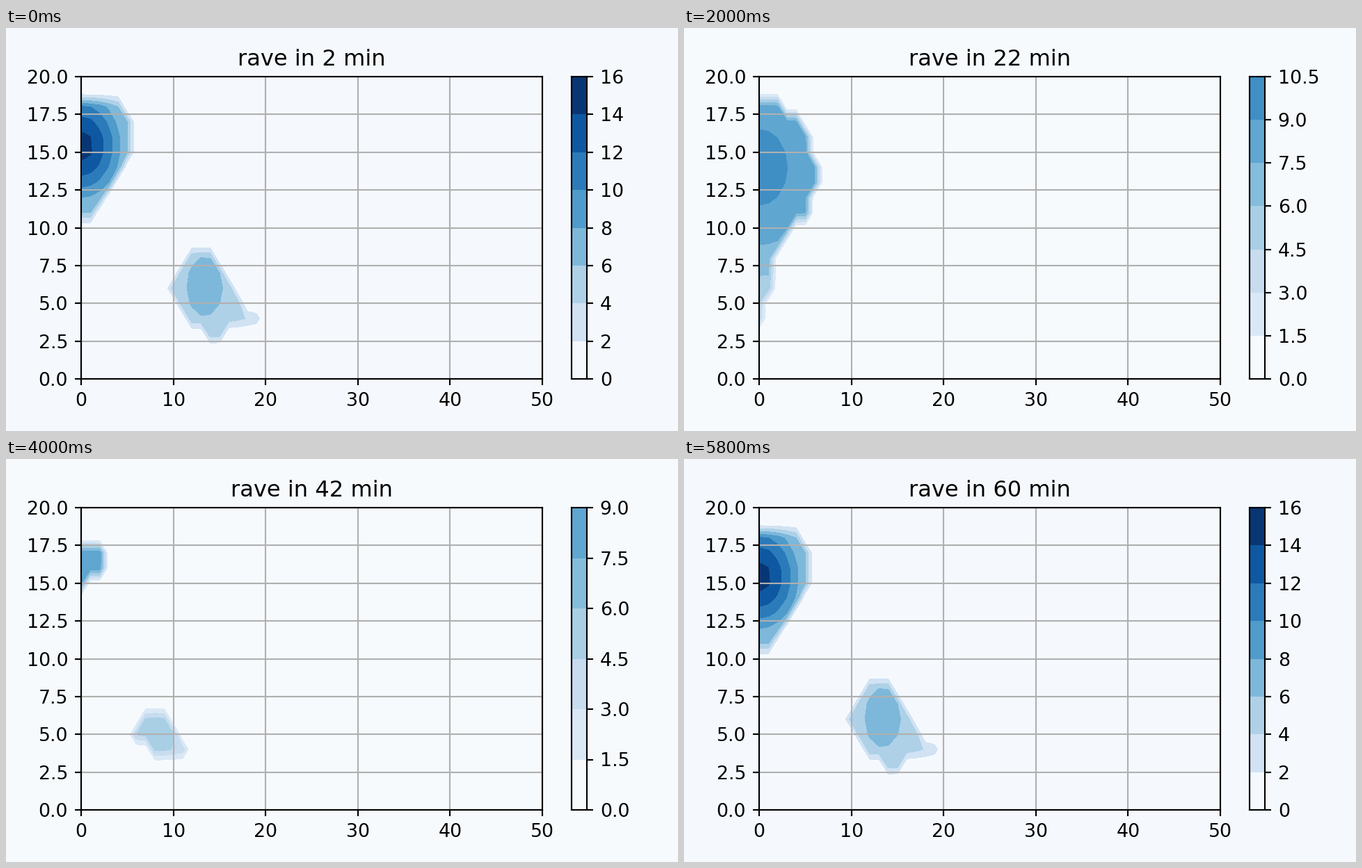
A matplotlib script for the animation above (6000 ms loop, 966 px wide and 580 px high).

```python
import numpy as np
import matplotlib
import matplotlib.pyplot as plt
from matplotlib.animation import FuncAnimation

W, H, DPI = 966, 580, 193
FRAMES, INTERVAL = 30, 200
VMAX = 15.4

plt.rcParams["font.family"] = "DejaVu Sans"
blues = matplotlib.colormaps["Blues"]
locator = matplotlib.ticker.MaxNLocator(8, min_n_ticks=1)
Y, X = np.mgrid[:21, :51]


def trace(outline):
    """Grid points along a closed outline of straight and diagonal edges."""
    for a, b in zip(outline, outline[1:] + outline[:1]):
        yield from np.linspace(a, b, max(abs(np.subtract(b, a))) + 1).astype(int)


def cell(outline, centre, radius, peak, edge):
    """Rain cell: a rounded cone from peak to edge, cut off at the outline."""
    points = np.array(list(trace(outline)))
    inside = np.zeros(X.shape, bool)
    for y in set(points[:, 1]):
        xs = points[points[:, 1] == y, 0]
        inside[y, xs.min():xs.max() + 1] = True
    d = np.hypot((X - centre[0]) / radius[0], (Y - centre[1]) / radius[1])
    return inside * (peak - (peak - edge) * np.minimum(d, 1) ** 1.5)


calm = np.zeros(X.shape)

# Cell at the left edge
west_peak = cell([(0, 18), (4, 18), (5, 17), (5, 15), (1, 11), (0, 11)],
                 (0, 15.4), (5, 4), peak=15.2, edge=6)
west_low = cell([(0, 11), (1, 11), (3, 9), (3, 7), (2, 6), (2, 5), (1, 4),
                 (1, 3), (0, 3)],
                (0, 8), (5.8, 5), peak=7.4, edge=4)
west_tall = cell([(0, 18), (2, 18), (3, 17), (4, 17), (5, 16), (5, 15), (6, 14),
                  (6, 13), (5, 12), (5, 11), (4, 11), (1, 8), (1, 6), (0, 5),
                  (0, 4)],
                 (0, 14), (11.5, 9.5), peak=9.8, edge=4)
west_loose = cell([(0, 17), (1, 18), (2, 18), (3, 17), (5, 17), (6, 16), (6, 15),
                   (5, 14), (3, 14), (1, 16), (0, 16)],
                  (3.4, 16), (4.1, 4.4), peak=10, edge=6)
west_rest = cell([(0, 17), (2, 17), (2, 16), (1, 16), (0, 15)],
                 (1, 17), (5, 3), peak=8.8, edge=7)

# Free cell drifting east
east_big = cell([(10, 6), (12, 8), (14, 8), (18, 4), (19, 4), (16, 4), (15, 3),
                 (14, 3), (13, 4), (12, 4)],
                (13.4, 6.1), (7, 7), peak=6.7, edge=2)
east_small = cell([(6, 5), (7, 6), (9, 6), (11, 4), (8, 4), (7, 5)],
                  (8, 5), (5, 4), peak=5.3, edge=2.5)
east_mid = cell([(6, 6), (7, 7), (10, 7), (13, 4), (16, 4), (9, 4), (8, 5),
                 (7, 5)],
                (7.8, 6), (8.5, 5), peak=7.05, edge=2)

KEYS = [0, 6, 10, 16, 20, 24, 29]
WEST = [west_peak, west_low, west_tall, west_loose, west_rest, calm, west_peak]
EAST = [east_big, calm, calm, calm, east_small, east_mid, east_big]


def centroid(grid):
    return np.array([(Y * grid).sum(), (X * grid).sum()]) / grid.sum()


def shifted(grid, step):
    dy, dx = np.rint(step).astype(int)
    return grid[np.clip(Y - dy, 0, Y.max()), np.clip(X - dx, 0, X.max())]


def morph(a, b, t):
    """Move a towards b while blending their values."""
    if not a.any() or not b.any():
        return (1 - t) * a + t * b
    move = centroid(b) - centroid(a)
    return (1 - t) * shifted(a, t * move) + t * shifted(b, (t - 1) * move)


def rain(frame):
    k = min(np.searchsorted(KEYS, frame, side="right") - 1, len(KEYS) - 2)
    t = (frame - KEYS[k]) / (KEYS[k + 1] - KEYS[k])
    return np.maximum(morph(WEST[k], WEST[k + 1], t),
                      morph(EAST[k], EAST[k + 1], t))


def box(left, top, right, bottom):
    return [left / W, 1 - bottom / H, (right - left) / W, (bottom - top) / H]


fig = plt.figure(figsize=(W / DPI, H / DPI), dpi=DPI)
ax = fig.add_axes(box(108, 70, 771, 505))
bar = fig.add_axes(box(813, 70, 835, 505))


def draw_bar(levels, colors):
    bar.clear()
    for lo, hi, color in zip(levels, levels[1:], colors):
        bar.axhspan(lo, hi, color=color, lw=0)
    bar.set_xticks([])
    bar.yaxis.tick_right()
    bar.set_yticks(levels)
    bar.set_ylim(levels[0], levels[-1])


def draw(frame):
    data = rain(frame)
    levels = locator.tick_values(0, data.max())
    levels = levels[:np.searchsorted(levels, data.max()) + 1]
    colors = blues((levels[:-1] + levels[1:]) / 2 / VMAX)
    colors[0] = (colors[0] + 1) / 2

    fig.set_facecolor(colors[0])
    ax.clear()
    ax.set_facecolor(colors[0])
    ax.contourf(data, levels=levels, colors=colors)
    ax.set_xlim(0, 50)
    ax.set_ylim(0, 20)
    ax.set_xticks(range(0, 51, 10))
    ax.set_yticks(np.arange(0, 20.1, 2.5))
    ax.grid(True)
    ax.set_title(f"rave in {2 * (frame + 1)} min")
    draw_bar(levels, colors)


anim = FuncAnimation(fig, draw, frames=FRAMES, interval=INTERVAL, repeat=True)
plt.show()
```
